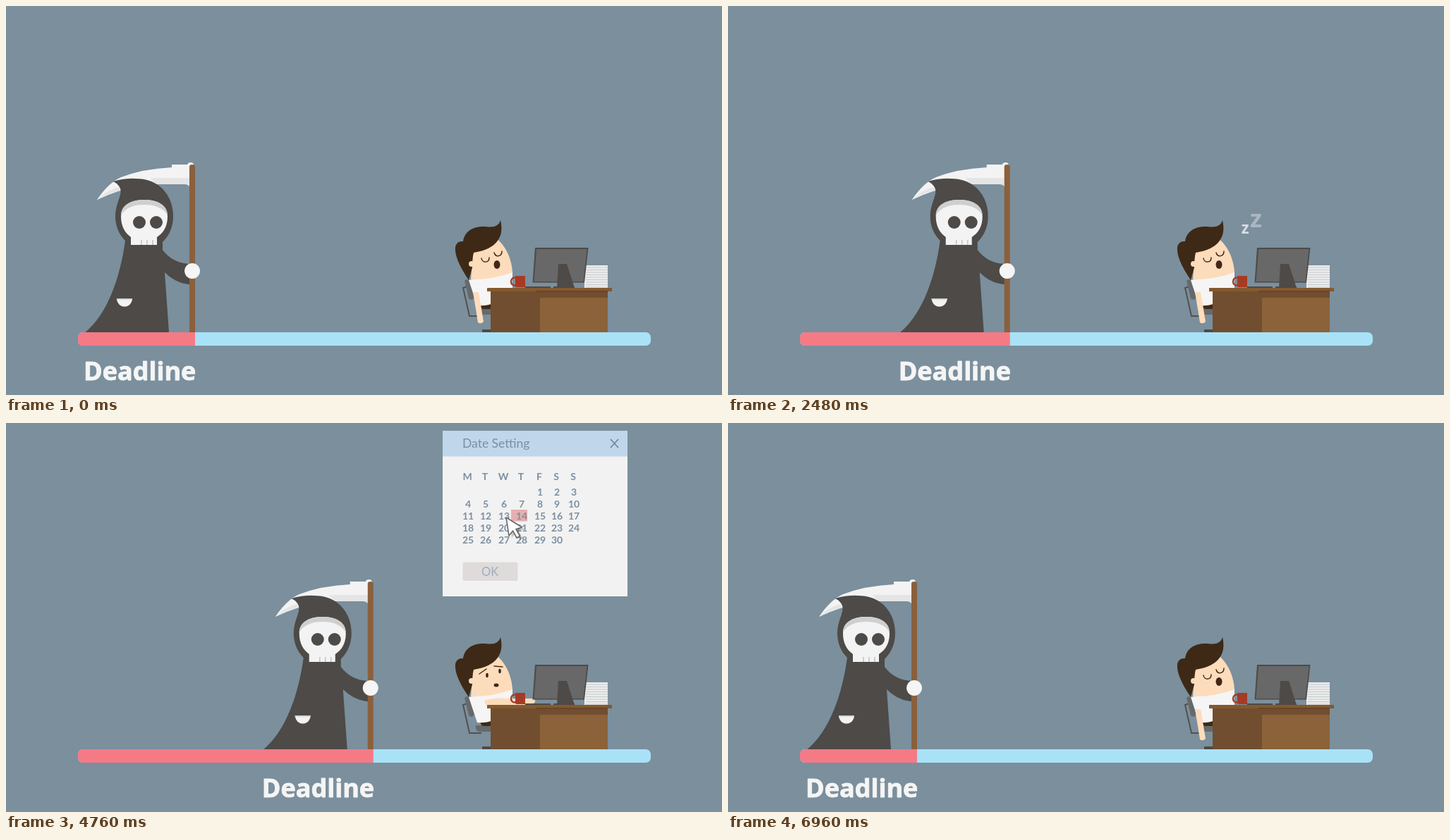
Animation, 1015 px wide and 552 px high, one loop 7000 ms. Source, as an HTML page:

```html
<!DOCTYPE html>
<html lang="en">
<head>
<meta charset="utf-8">
<title>Deadline</title>
<style>
  html, body { margin: 0; width: 100%; height: 100%; overflow: hidden; background: #7b8f9d; }
  svg { display: block; width: 100%; height: 100%; }
  text { font-family: Lato, sans-serif; }
  .title { font: 700 36px "Open Sans", sans-serif; fill: #f5f5f5; stroke: #f5f5f5; stroke-width: .9; stroke-linejoin: round; }
  .zz { font: 700 24px "Open Sans", sans-serif; fill: #eef1f4; text-anchor: middle; }
  .days { font-weight: 700; font-size: 14px; fill: #7b8fa1; text-anchor: middle; }
  .line { fill: none; stroke: #3e2a18; stroke-width: 1.5; stroke-linecap: round; }
</style>
</head>
<body>
<svg viewBox="0 0 1015 552">
  <defs><clipPath id="barShape"><rect x="102" y="463" width="812" height="19" rx="7"/></clipPath></defs>
  <rect width="1015" height="552" fill="#7b8f9d"/>

  <g clip-path="url(#barShape)">
    <rect x="102" y="463" width="812" height="19" fill="#a9e2f7"/>
    <rect id="elapsed" x="102" y="463" height="19" fill="#f47a86"/>
  </g>

  <g id="reaper">
    <path fill="#f3f3f3" d="M129 275Q145 251 163 243Q194 231 235 229V225H257Q258 222 262 222Q266 222 266 226V256H260Q259 253 254 253L213 252Q174 254 129 275Z"/>
    <path fill="#e5e5e5" d="M205 244H260V256Q258 253 254 253H213ZM129 275Q147 264 163 262L160 257Q145 260 129 275Z"/>
    <path fill="#4d4a47" d="M152 249Q169 244 185 245C219 245 237 271 237 298Q237 320 222 335V346Q236 365 261 366V395Q241 394 225 378L231 463H112.5C144 437 162 385 169 333Q155 319 155 298C155 280 165 269 162 259Q159 252 152 249Z"/>
    <path fill="#f3f3f3" d="M163 299C163 282 178 275 196 275S229 282 229 299C229 313 223 322 214 328V339H177V328C169 322 163 313 163 299Z"/>
    <path fill="#cfcfcf" d="M163 297C163 282 178 275 196 275S229 282 229 297C223 286 210 282 196 282S169 286 163 297Z"/>
    <g fill="#4d4a47"><circle cx="189" cy="307" r="9"/><circle cx="213" cy="307" r="9"/></g>
    <path stroke="#c4c4c4" stroke-width="1.6" d="M192 332V339M200 332V339M208 332V339"/>
    <path fill="#f3f3f3" d="M157 415H179A11 11.5 0 0 1 157 415Z"/>
    <path fill="#d5d5d5" d="M157 415H179V417H157Z"/>
    <path fill="#8a603c" d="M260 463V228Q260 225 264 225T268 228V463Z"/>
    <circle cx="264" cy="376" r="11" fill="#f5f5f5"/>
    <text class="title" x="110" y="531">Deadline</text>
  </g>

  <g id="chair">
    <path fill="none" stroke="#55504c" stroke-width="2" d="M654 398L648 400L657 440H674"/>
    <path fill="#66696b" d="M650 390Q654 386 657 390L664 414Q660 419 656 415ZM666 429H690V438H670Q665 436 666 429Z"/>
    <path fill="#4d4a47" d="M675 459H690V463H675Z"/>
  </g>

  <g id="man">
    <path fill="#3e2916" d="M672 421L690 420V430H676Q672 428 672 421Z"/>
    <path fill="#f5f5f5" d="M656 389L718 377V400H690V422Q680 426 668 425Z"/>
    <path fill="#fddcbb" d="M659 388L662 348L698 332Q716 350 718 378Q692 388 659 388Z"/>
    <path fill="#3e2916" d="M656 389Q635 358 637 342Q639 333 648 334C650 319 663 312 680 313Q698 316 701 304C704 317 702 326 697 333Q688 346 663 350Q661 357 661 371Z"/>
    <circle cx="660" cy="366" r="4" fill="#fddcbb"/>
    <g id="asleep">
      <path class="line" d="M674 358C675 365 685 365 685 357M692 350C694 357 703 356 703 348"/>
      <ellipse cx="696" cy="367" rx="4.5" ry="6" fill="#442516"/>
    </g>
    <g id="awake">
      <path class="line" d="M671 356L681 349M692 345L704 346"/>
      <g fill="#3e2916"><ellipse cx="682" cy="358" rx="1.8" ry="3.2"/><ellipse cx="700" cy="352" rx="1.8" ry="3.2"/><ellipse cx="695" cy="372" rx="3.5" ry="2.5"/></g>
    </g>
    <g id="armDown">
      <path fill="#fddcbb" d="M662 406H670L677 448Q673 452 669 449Z"/>
      <path fill="#f5f5f5" d="M658 394L672 397L671 406H662Z"/>
    </g>
    <path id="armTyping" fill="#fddcbb" d="M678 394Q691 389 713 391H747Q753 394 748 398L738 400H680Z"/>
  </g>

  <g id="desk">
    <path fill="#ededed" d="M820 368H853V400H820Z"/>
    <path id="papers" stroke="#c3c7ca"/>
    <path fill="#4d4a47" d="M736 398H772V400H736ZM776 398H806V400H776ZM750 343H825.5L820 392.500H746.500Z"/>
    <path fill="#686868" d="M752 345H823.500L818.500 391H748.500Z"/>
    <path fill="#4d4a47" d="M783 366H795L806 400H781Z"/>
    <path fill="#a63b25" d="M722 383H736V399H724Q722 399 722 397Z"/>
    <ellipse cx="721" cy="391" rx="5" ry="5.500" fill="none" stroke="#a63b25" stroke-width="2.500"/>
    <path fill="#714e2f" d="M687 405H853V463H687Z"/>
    <path fill="#8b6239" d="M757 414H853V463H757Z"/>
    <path fill="#84592f" d="M682 400H859V405H682Z"/>
    <path fill="#68452a" d="M752 404H853V406H752Z"/>
  </g>

  <text id="smallZ" class="zz">z</text>
  <text id="bigZ" class="zz">z</text>

  <g id="dialog">
    <rect x="619" y="11" width="262" height="235" fill="#f2f2f2"/>
    <rect x="619" y="11" width="262" height="36.500" fill="#c0d6eb"/>
    <text x="647" y="34.500" font-size="17.500" fill="#7b8fa1">Date Setting</text>
    <path stroke="#72869a" stroke-width="1.800" d="M857 23L868 35M868 23L857 35"/>
    <rect id="chosen" y="123" width="23" height="16.500" fill="#e5afaf"/>
    <g id="calendar" class="days"></g>
    <rect x="647.500" y="197.500" width="78" height="26.500" rx="2" fill="#dfdbdb"/>
    <text x="686" y="217" font-size="16.500" fill="#9caebd" text-anchor="middle">OK</text>
    <g id="cursor">
      <path id="shadow" fill="#000" opacity=".18" transform="translate(4 3)"/>
      <path id="arrow" fill="#fff" stroke="#666" stroke-width="1.600" stroke-linejoin="round"/>
    </g>
  </g>
</svg>
<script>
const el = id => document.getElementById(id);
const clamp = v => Math.min(1, Math.max(0, v));
const ramp = (t, from, to) => clamp((t - from) / (to - from));
const smooth = u => u * u * (3 - 2 * u);
const mix = (a, b, u) => a + (b - a) * u;
const show = (id, visible) => el(id).setAttribute('visibility', visible ? 'visible' : 'hidden');
const move = (id, x, y) => el(id).setAttribute('transform', `translate(${x} ${y})`);

const LOOP = 7000, STEP = 40, SPEED = 0.0531;
const RETREAT = 5900, RETREAT_END = 6960;

// Calendar: the first day falls on the fifth column.
const columns = [655, 680, 706, 731, 757, 781, 805];
const label = (text, x, y) => `<text x="${x}" y="${y}">${text}</text>`;
let days = [...'MTWTFSS'].map((d, i) => label(d, columns[i] - 1, 81)).join('');
for (let day = 1; day <= 30; day++) {
  const cell = day + 3;
  days += label(day, columns[cell % 7], 103 + 17.1 * Math.floor(cell / 7));
}
el('calendar').innerHTML = days;

let sheets = '';
for (let y = 371; y < 400; y += 3.5) sheets += `M822 ${y}H853`;
el('papers').setAttribute('d', sheets);

const arrowShape = 'M0 0L4 26L9.500 19L15 29L19.500 26.500L14 16.500L22.500 14Z';
el('arrow').setAttribute('d', arrowShape);
el('shadow').setAttribute('d', arrowShape);

function reaperOffset(t) {
  if (t < RETREAT) return t * SPEED;
  const u = ramp(t, RETREAT, RETREAT_END);
  const eased = (u + (1 - Math.cos(Math.PI * u)) / 2) / 2;
  return RETREAT * SPEED * (1 - eased);
}

function drawZ(id, t, delay, x, y, dx, dy, scale, alpha) {
  const age = t - delay, p = (age % 900) / 900;
  show(id, age >= 0 && t < 3600);
  el(id).setAttribute('transform', `translate(${x + dx * p} ${y + dy * p}) scale(${scale})`);
  el(id).setAttribute('opacity', clamp(alpha(p)));
}

function drawDialog(t) {
  const opening = ramp(t, 3840, 4240), closing = ramp(t, 5600, 5880);
  el('dialog').setAttribute('opacity', opening * (1 - closing));
  move('dialog', 0, 43 * (1 - smooth(opening)));
  el('chosen').setAttribute('x', t < 4640 ? 745 : 716);
  const toDate = smooth(ramp(t, 4000, 4740)), toButton = smooth(ramp(t, 4880, 5240));
  move('cursor', mix(mix(825, 709, toDate), 688, toButton), mix(mix(226, 134, toDate), 208, toButton));
}

function draw(t) {
  const offset = reaperOffset(t);
  move('reaper', offset, 0);
  el('elapsed').setAttribute('width', 166 + offset);

  const awake = t >= 3640 && t < 6720, typing = t >= 3640 && t < 5920;
  show('awake', awake);
  show('asleep', !awake);
  show('armTyping', typing);
  show('armDown', !typing);

  drawZ('smallZ', t, 0, 725.6, 336.5, 10, -18, 0.93, p => Math.min(p * 1.9, (1 - p) * 3.3, 0.8));
  drawZ('bigZ', t, 450, 746.4, 319.5, 8, -20, 1.45, p => Math.min(p * 1.6, (1 - p) * 1.8, 0.55));
  drawDialog(t);
}

function frame() {
  draw(Math.floor(performance.now() % LOOP / STEP) * STEP);
  requestAnimationFrame(frame);
}
frame();
</script>
</body>
</html>
```
